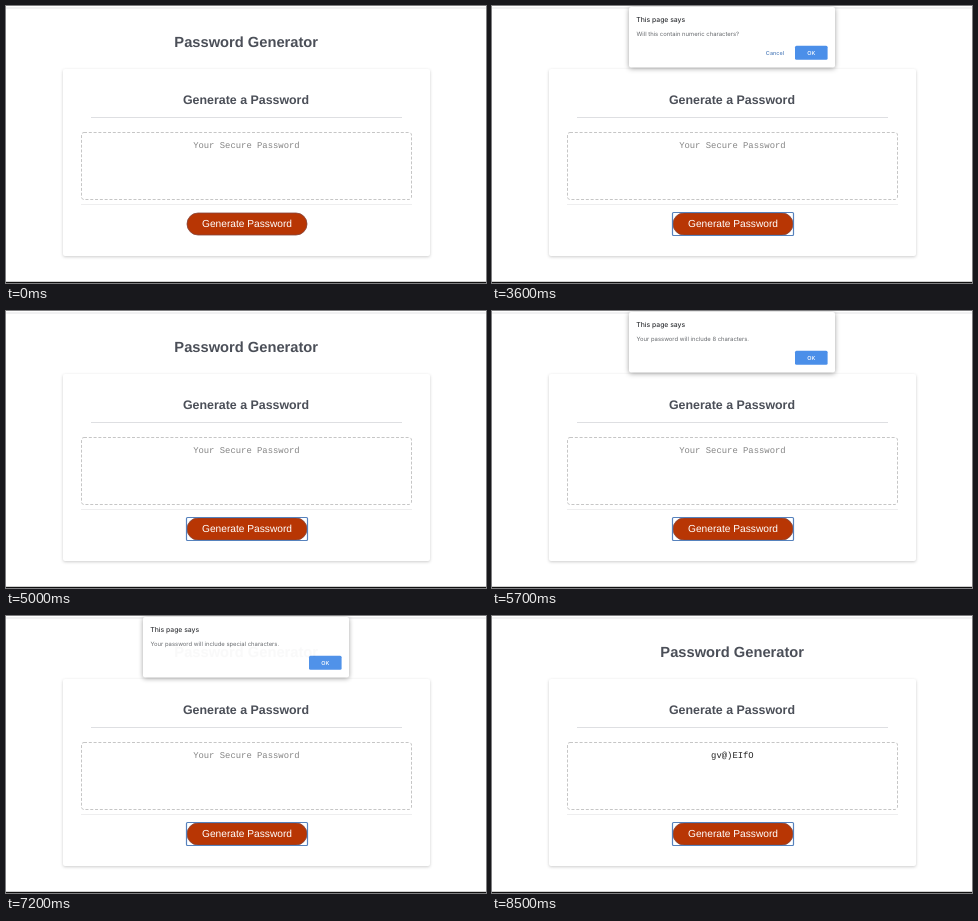
An HTML page that plays this animation: 480x277 px, repeating every 8.6 s.

```html
<!DOCTYPE html>
<html lang="en">
<head>
<meta charset="utf-8">
<title>Password Generator</title>
<style>
  html, body { margin: 0; width: 100%; height: 100%; overflow: hidden; background: #fff; }
  svg { display: block; width: 100%; height: 100%; }
  text { text-rendering: geometricPrecision; }
  .page { font-family: "Liberation Sans", Arial, sans-serif; text-anchor: middle; }
  .heading { font-weight: 700; fill: #4b4f58; }
  .mono { font: 8.9px "Liberation Mono", "Courier New", monospace; text-anchor: middle; }
  .dialog { font: 5.9px Inter, Roboto, sans-serif; fill: #66696d; }
  .card { fill: #fff; filter: drop-shadow(0 1px 1.6px rgba(0, 0, 0, .2)); }
  .sheet { fill: #fff; filter: drop-shadow(0 1px 2.5px rgba(0, 0, 0, .38)); }
</style>
</head>
<body>
<svg viewBox="0 0 480 277" preserveAspectRatio="none">
  <rect width="480" height="277" fill="#fff"/>
  <rect y="1" width="480" height="2" fill="#f1f1f2"/>
  <rect y="275.8" width="480" height="1.2" fill="#111"/>

  <g class="page">
    <text class="heading" x="240.2" y="40.8" font-size="14.7">Password Generator</text>
    <rect class="card" x="57" y="63" width="367" height="187" rx="2"/>
    <text class="heading" x="240" y="98" font-size="12.4">Generate a Password</text>
    <path d="M85 111.5H396" stroke="#dedfe2"/>
    <path d="M75 198.5H406" stroke="#eeeeef"/>
    <rect x="75.5" y="126.5" width="330" height="67" rx="2.5" fill="none"
          stroke="#c6c6c6" stroke-dasharray="3 1.8"/>
    <rect x="181" y="207" width="120" height="22" rx="11" fill="#b83604" stroke="#85463d" stroke-width=".8"/>
    <rect id="focus" x="180.5" y="206.5" width="121" height="23" rx="1" fill="none" stroke="#5682bd" stroke-width="1.2"/>
    <text x="241" y="221.4" font-size="10.2" fill="#fff">Generate Password</text>
  </g>
  <text id="output" class="mono" x="240.4" y="141.8"></text>

  <g id="dialog" class="dialog">
    <rect id="sheet" class="sheet" x="137" y="1" width="206" rx="2"/>
    <text x="144.3" y="16.3" font-size="6.8" font-weight="500" fill="#303236">This page says</text>
    <text id="line1" x="144.5" y="29.7"></text>
    <g id="prompt">
      <text x="144.5" y="38.2">Pick a number between 8-128.</text>
      <rect x="144.7" y="44.8" width="190.8" height="14.2" rx="1" fill="#fff" stroke="#6797ce" stroke-width="1.1"/>
      <text id="entry" x="147.5" y="54.2" fill="#333"></text>
      <rect id="caret" y="48.3" width=".8" height="7.2" fill="#333"/>
    </g>
    <g id="actions" font-size="5.5" font-weight="500" text-anchor="middle">
      <text id="cancel" x="283" y="48.6" fill="#5582bd">Cancel</text>
      <rect x="303" y="39.7" width="32.6" height="14" rx="1.5" fill="#4b8fe9"/>
      <text x="319.2" y="48.6" fill="#fff">OK</text>
    </g>
  </g>
</svg>

<script>
const LOOP = 8600;
const el = Object.fromEntries([...document.querySelectorAll('[id]')].map(node => [node.id, node]));

const prompt = { kind: 'prompt', text: 'How many characters do you want to include in your password?' };
const confirmBox = what => ({ kind: 'confirm', text: `Will this contain ${what}?` });
const alertBox = what => ({ kind: 'alert', text: `Your password will include ${what}.` });
const [numeric, special, lower, upper] = ['numeric', 'special', 'lowercase', 'uppercase'].map(s => s + ' characters');

// Each row: dialog, then pairs of [time, opacity]
const dialogs = [
  [prompt, [1400, 1], [2700, .5], [2800, 0]],
  [confirmBox(numeric), [2900, .6], [3000, 1], [4100, .5], [4200, 0]],
  [confirmBox(special), [4300, 1], [4500, .5], [4600, 0]],
  [confirmBox(lower), [4700, .7], [4800, 1], [4900, .5], [5000, 0]],
  [confirmBox(upper), [5100, 1], [5500, .5], [5600, 0]],
  [alertBox('8 characters'), [5700, 1], [6000, .95], [6100, .3], [6200, 0]],
  [alertBox(numeric), [6300, 1], [6600, .5], [6700, 0]],
  [alertBox(special), [6800, 1], [7200, .97], [7300, .3], [7400, 0]],
  [alertBox(lower), [7500, 1], [7700, .5], [7800, 0]],
  [alertBox(upper), [7900, 1], [8300, .5], [8400, 0]]
];
const steps = dialogs.flatMap(([box, ...fades]) => fades.map(([at, opacity]) => ({ at, opacity, box })));

const show = (node, on) => node.setAttribute('visibility', on ? 'inherit' : 'hidden');
const setText = (node, value) => { if (node.textContent !== value) node.textContent = value; };

function render(t) {
  const done = t >= 8500;
  show(el.focus, t >= 900);
  setText(el.output, done ? 'gv@)EIfO' : 'Your Secure Password');
  el.output.setAttribute('fill', done ? '#222' : '#858585');

  const step = steps.findLast(s => s.at <= t);
  show(el.dialog, step && step.opacity > 0);
  if (!step) return;

  const { kind, text } = step.box;
  const isPrompt = kind === 'prompt';
  const typed = t >= 2500;
  el.dialog.setAttribute('opacity', step.opacity);
  el.sheet.setAttribute('height', isPrompt ? 91.5 : 60.5);
  el.actions.setAttribute('transform', `translate(0 ${isPrompt ? 31 : 0})`);
  setText(el.line1, text);
  setText(el.entry, typed ? '8' : '');
  el.caret.setAttribute('x', typed ? 151.6 : 147.8);
  show(el.prompt, isPrompt);
  show(el.caret, isPrompt && (t < 1800 || t >= 2300));
  show(el.cancel, kind !== 'alert');
}

const start = performance.now();
function tick() {
  render((performance.now() - start) % LOOP);
  requestAnimationFrame(tick);
}
tick();
</script>
</body>
</html>
```
